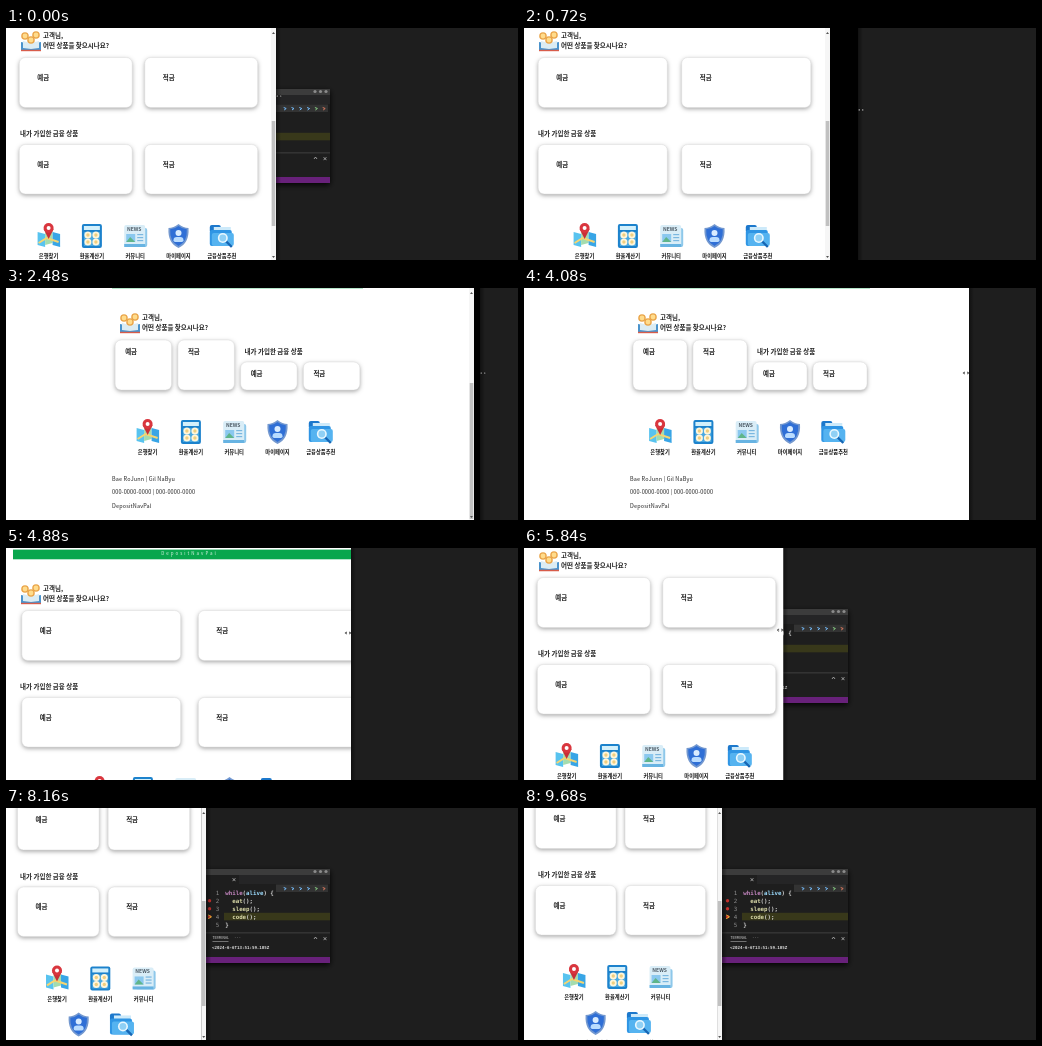
An HTML page with a canvas for the animation above (9.76 s loop, 512 by 232 pixels).

```html
<!DOCTYPE html>
<html lang="ko">
<head>
<meta charset="utf-8">
<style>
html, body { margin: 0; width: 100%; height: 100%; overflow: hidden; background: #1e1e1e; }
canvas { display: block; width: 512px; height: 232px; }
</style>
</head>
<body>
<canvas id="stage" width="512" height="232"></canvas>
<script>
const ctx = document.getElementById('stage').getContext('2d');
const LOOP = 9760, STEP = 80;
const WIDE_FROM = 373, WRAP_BELOW = 231, SCROLLBAR = 5;
const TURN = 3400, SETTLED = 6880;
const SANS = '"Noto Sans CJK KR", "Noto Sans CJK", "Noto Sans", sans-serif';
const MONO = '"DejaVu Sans Mono", monospace';

// The dragged window edge; the painted page trails behind it.
const drag = [
  { time: 0, edge: 270, page: 270 },
  { time: 720, edge: 334, page: 306 },
  { time: 2480, edge: 474, page: 468 },
  { time: TURN, edge: 506, page: 506 },
  { time: 4080, edge: 445, page: 457 },
  { time: 4880, edge: 345, page: 372 },
  { time: SETTLED, edge: 202, page: 202 },
  { time: LOOP, edge: 198, page: 198 },
];

function ramp(t, from, to) {
  return Math.min(1, Math.max(0, (t - from) / (to - from)));
}

function dragAt(t) {
  const i = drag.findIndex(key => key.time > t);
  const a = drag[i - 1], b = drag[i];
  let u = ramp(t, a.time, b.time);
  if (b.time === SETTLED) u = 1 - (1 - u) ** 1.4;
  return { edge: a.edge + (b.edge - a.edge) * u, page: a.page + (b.page - a.page) * u };
}

function narrowTop(t) {
  const scrolledUp = ramp(t, TURN, 4200) - ramp(t, 4960, 5200);
  return 8 + 33 * scrolledUp - 36 * ramp(t, 6080, 6320) - 3 * ramp(t, SETTLED, 9360);
}

function rect(x, y, w, h, color) {
  ctx.fillStyle = color;
  ctx.fillRect(x, y, w, h);
}

function round(x, y, w, h, r, color) {
  ctx.fillStyle = color;
  ctx.beginPath();
  ctx.roundRect(x, y, w, h, r);
  ctx.fill();
}

function dot(x, y, r, color) {
  ctx.fillStyle = color;
  ctx.beginPath();
  ctx.arc(x, y, r, 0, Math.PI * 2);
  ctx.fill();
}

function poly(points, color) {
  ctx.fillStyle = color;
  ctx.beginPath();
  points.forEach(([x, y]) => ctx.lineTo(x, y));
  ctx.fill();
}

function line(points, color, width = 1) {
  ctx.strokeStyle = color;
  ctx.lineWidth = width;
  ctx.beginPath();
  points.forEach(([x, y]) => ctx.lineTo(x, y));
  ctx.stroke();
}

function text(str, x, y, size, color = '#222', { weight = 700, family = SANS, align = 'left', spacing = 0 } = {}) {
  ctx.font = `${weight} ${size}px ${family}`;
  ctx.textAlign = align;
  ctx.textBaseline = 'alphabetic';
  ctx.letterSpacing = spacing + 'px';
  ctx.fillStyle = color;
  ctx.fillText(str, x, y + size * 0.36);
}

function clipped(width, paint) {
  ctx.save();
  ctx.beginPath();
  ctx.rect(0, 0, width, 232);
  ctx.clip();
  paint();
  ctx.restore();
}

function placed(x, y, paint) {
  ctx.save();
  ctx.translate(x, y);
  paint();
  ctx.restore();
}

function mapIcon() {
  for (let i = 0; i < 3; i++) {
    const x = -11 + i * 7.5, tilt = i % 2 ? -2 : 2;
    poly([[x, -4], [x + 7.5, -4 + tilt], [x + 7.5, 9 + tilt], [x, 9]], ['#58c3ef', '#a4dcae', '#38a5e6'][i]);
  }
  line([[-10, 7], [-2, 2], [10, 6]], '#f5d570', 2);
  poly([[-5, -7], [5, -7], [0, 3]], '#c92f37');
  dot(0, -8, 5, '#d9363e');
  dot(0, -8, 2, '#fff');
}

function calculatorIcon() {
  round(-10, -12, 20, 24, 2, '#1c82cc');
  rect(-8, -10, 16, 4, '#d3f0fb');
  rect(-8, -4, 16, 14, '#4aa9e2');
  for (const x of [-4, 4]) {
    for (const y of [-1, 6]) {
      dot(x, y, 3.5, '#fff6db');
      dot(x, y, 1.7, '#f0cf80');
    }
  }
}

function newsIcon() {
  round(-8, -8, 20, 19, 2, '#8ec8ea');
  round(-11, -11, 21, 22, 2, '#d9edf7');
  text('NEWS', -1, -7, 5, '#4c5964', { align: 'center' });
  rect(-9, -2, 9, 8, '#8ac8ef');
  poly([[-9, 6], [-5, 1], [0, 6]], '#5fb58a');
  for (let y = -2; y < 6; y += 3) rect(2, y, 6, 1.2, '#7ab7e0');
  rect(-11, 8, 21, 3, '#67b3e2');
}

function shield(scale, color) {
  ctx.save();
  ctx.scale(scale, scale);
  ctx.fillStyle = color;
  ctx.beginPath();
  ctx.moveTo(0, -12);
  for (const side of [1, -1]) {
    if (side > 0) {
      ctx.quadraticCurveTo(5, -8, 10, -8);
      ctx.quadraticCurveTo(11, 7, 0, 12);
    } else {
      ctx.quadraticCurveTo(-11, 7, -10, -8);
      ctx.quadraticCurveTo(-5, -8, 0, -12);
    }
  }
  ctx.fill();
  ctx.restore();
}

function shieldIcon() {
  shield(1, '#7398cf');
  shield(0.83, '#2f6fd6');
  dot(0, -3, 3, '#d9ecff');
  round(-5, 1, 10, 5, [4, 4, 2, 2], '#b9dcff');
}

function folderIcon() {
  round(-12, -11, 11, 8, 2, '#1c78cc');
  rect(-8, -9, 17, 10, '#cdeafa');
  round(-12, -6, 22, 16, 2, '#2f95e4');
  round(-10, -3, 22, 13, 2, '#55b3f0');
  line([[4, 5], [10, 11]], '#1766b4', 2.4);
  dot(1, 2, 5, '#e9f8ff');
  dot(1, 2, 3.4, '#8fd0f5');
}

function coinsIcon() {
  poly([[-10, 1], [0, 3], [10, 1], [10, 9], [0, 10], [-10, 9]], '#4a93cc');
  for (const side of [-1, 1]) poly([[side * 8, 0], [0, 2], [0, 8], [side * 8, 7]], '#dcecf3');
  line([[-10, 9.5], [10, 9.5]], '#d85c4a', 1.4);
  for (const [x, y] of [[-6, -5], [5, -6], [0, -1]]) {
    dot(x, y, 3.8, '#eaa54a');
    dot(x, y, 2.4, '#ffdc8c');
  }
}

const services = [['은행찾기', mapIcon], ['환율계산기', calculatorIcon], ['커뮤니티', newsIcon],
  ['마이페이지', shieldIcon], ['금융상품추천', folderIcon]];

function card(x, y, w, h, label, dx, dy) {
  ctx.save();
  ctx.shadowColor = 'rgba(0,0,0,.36)';
  ctx.shadowBlur = 4;
  ctx.shadowOffsetY = 1.6;
  round(x, y, w, h, 6, '#fff');
  ctx.restore();
  ctx.strokeStyle = '#dcdcdc';
  ctx.lineWidth = 0.5;
  ctx.stroke();
  text(label, x + dx, y + dy, 6.5);
}

function serviceRow(items, center, y) {
  items.forEach(([label, icon], i) => {
    const x = center + (i - (items.length - 1) / 2) * 43.3;
    placed(x, y, icon);
    text(label, x, y + 20.5, 5.3, '#111', { align: 'center' });
  });
}

function scrollbar(x, wide) {
  const top = wide ? 95 : 93, bottom = wide ? 231 : 198;
  rect(x, 0, SCROLLBAR, 232, '#f6f6f6');
  rect(x + 0.7, top, 3.6, bottom - top, '#c1c1c1');
  poly([[x + 1, 6], [x + 4, 6], [x + 2.5, 4]], '#555');
  poly([[x + 1, 228], [x + 4, 228], [x + 2.5, 230]], '#555');
}

function page(width, t) {
  const wide = width >= WIDE_FROM;
  const columns = wide ? 4 : 2;
  const left = wide ? 106 : 7;
  const inner = width - left * 2;
  const pitch = inner / columns;
  const top = wide ? 30 : narrowTop(t);
  const column = i => left + pitch * (i + 0.05);
  const cardWidth = pitch * 0.9;

  rect(0, 0, width, 232, '#fff');
  rect(left, top - 39.4, inner, 9.7, '#09a64d');
  text('DepositNavPal', left + inner / 2, top - 36, 4.5, '#d7f1e2', { weight: 400, align: 'center', spacing: 2 });

  placed(left + 18, top + 5, coinsIcon);
  text('고객님,', left + 30, top, 6.5);
  text('어떤 상품을 찾으시나요?', left + 30, top + 10, 6.5);

  const labels = ['예금', '적금'];
  const title = '내가 가입한 금융 상품';
  if (wide) {
    labels.forEach((label, i) => {
      card(column(i), top + 22, cardWidth, 50, label, 10, 12);
      card(column(i + 2), top + 44, cardWidth, 28, label, 10, 12);
    });
    text(title, left + pitch * 2 + 7, top + 33.5, 6.5);
    const footer = ['Bae RoJunn | Gil NaByu', '000-0000-0000 | 000-0000-0000', 'DepositNavPal'];
    footer.forEach((str, i) => {
      text(str, left, top + 161 + i * 13.4, 5.5, '#222', { weight: 400, spacing: 0.15 });
    });
  } else {
    labels.forEach((label, i) => {
      card(column(i), top + 21.5, cardWidth, 50, label, 18, 20);
      card(column(i), top + 108.5, cardWidth, 49.5, label, 18, 20);
    });
    text(title, left + 7, top + 98, 6.5);
  }

  const center = left + inner / 2 - 3.3;
  const perRow = width < WRAP_BELOW ? 3 : 5;
  for (let i = 0; i < services.length; i += perRow) {
    const y = top + (wide ? 114 : 200) + i / perRow * 46;
    serviceRow(services.slice(i, i + perRow), center, y);
  }
  scrollbar(width, wide);
}

function code(parts, y) {
  let x = 219.3;
  for (const [str, color] of parts) {
    text(str, x, y, 5.75, color, { family: MONO });
    x += ctx.measureText(str).width;
  }
}

function editor(t) {
  const sleeping = t > 5000 && t < 7600;
  const current = sleeping ? 3 : 4;
  const rowY = n => 76.8 + n * 8;

  ctx.save();
  ctx.shadowColor = '#000';
  ctx.shadowBlur = 6;
  ctx.shadowOffsetY = 2;
  rect(160, 61, 164, 94, '#1e1e1e');
  ctx.restore();
  rect(160, 61, 164, 6, '#3c3c3c');
  for (let i = 0; i < 3; i++) dot(309 + i * 5.5, 63.5, 1.6, '#8b8b8b');
  rect(160, 67, 164, 9, '#252526');
  rect(160, 67, 73, 9, '#1e1e1e');
  text('×', 228, 71, 5, '#ccc', { align: 'center' });

  rect(218, rowY(current) - 4, 106, 7.5, '#38381a');
  rect(270, 76.5, 52, 7.5, '#333');
  for (let i = 0; i < 6; i++) {
    const color = i < 4 ? '#75beff' : i < 5 ? '#89d185' : '#e07a5f';
    const x = 279 + i * 7.8;
    line([[x - 1.3, 79.5], [x + 1.2, 80.5], [x - 0.8, 82]], color);
  }

  for (let n = 1; n <= 5; n++) {
    text(n, 211.5, rowY(n), 5.75, '#8f8f8f', { weight: 400, family: MONO, align: 'center' });
    if (n > 1 && n < 5) dot(203.5, rowY(n), 1.7, '#c5302c');
  }
  const arrowY = rowY(current);
  line([[202, arrowY - 2], [205.5, arrowY], [202, arrowY + 2]], '#ffcc33', 0.8);

  code([['while', '#c586c0'], ['(', '#d4d4d4'], ['alive', '#9cdcfe'], [') {', '#d4d4d4']], rowY(1));
  ['eat', 'sleep', 'code'].forEach((name, i) => {
    code([['  ' + name, '#dcdcaa'], ['();', '#d4d4d4']], rowY(i + 2));
  });
  code([['}', '#d4d4d4']], rowY(5));

  rect(160, 124.5, 164, 0.8, '#484848');
  text('TERMINAL', 206.5, 130, 3.4, '#ddd', { weight: 400 });
  rect(206.5, 133, 16, 0.6, '#aaa');
  text('···', 228, 130, 4, '#aaa');
  line([[308, 131], [309.5, 129], [311, 131]], '#ccc', 0.7);
  text('×', 319, 130, 5, '#ccc', { align: 'center' });
  const seconds = sleeping ? '55.771' : '59.105';
  text(`<2024-6-6T13:51:${seconds}Z`, 206, 139.5, 4.15, '#ddd', { family: MONO });
  rect(160, 149, 164, 6, '#68217a');
}

function resizeCursor(x, y) {
  for (const side of [-1, 1]) {
    poly([[x + side * 3.4, y], [x + side * 1.2, y - 1.6], [x + side * 1.2, y + 1.6]], '#111');
    dot(x + side * 1.8, y, 0.6, '#fff');
  }
}

function draw(t) {
  const { edge, page: painted } = dragAt(t);
  rect(0, 0, 512, 232, '#1e1e1e');
  editor(t);

  const shade = ctx.createLinearGradient(edge, 0, edge + 5, 0);
  shade.addColorStop(0, 'rgba(0,0,0,.45)');
  shade.addColorStop(1, 'rgba(0,0,0,0)');
  rect(edge, 0, 5, 232, shade);

  clipped(edge, () => {
    rect(0, 0, edge, 232, '#000');
    clipped(painted, () => page(painted - SCROLLBAR, t));
  });

  const y = 68 + 17 * ramp(t, 0, 880) - 6 * ramp(t, 4880, SETTLED);
  if (t <= SETTLED) resizeCursor(edge + (t < TURN ? 3 : -3), y);
}

const start = performance.now();
function tick() {
  const elapsed = (performance.now() - start) % LOOP;
  draw(Math.floor(elapsed / STEP) * STEP);
  requestAnimationFrame(tick);
}
tick();
</script>
</body>
</html>
```
